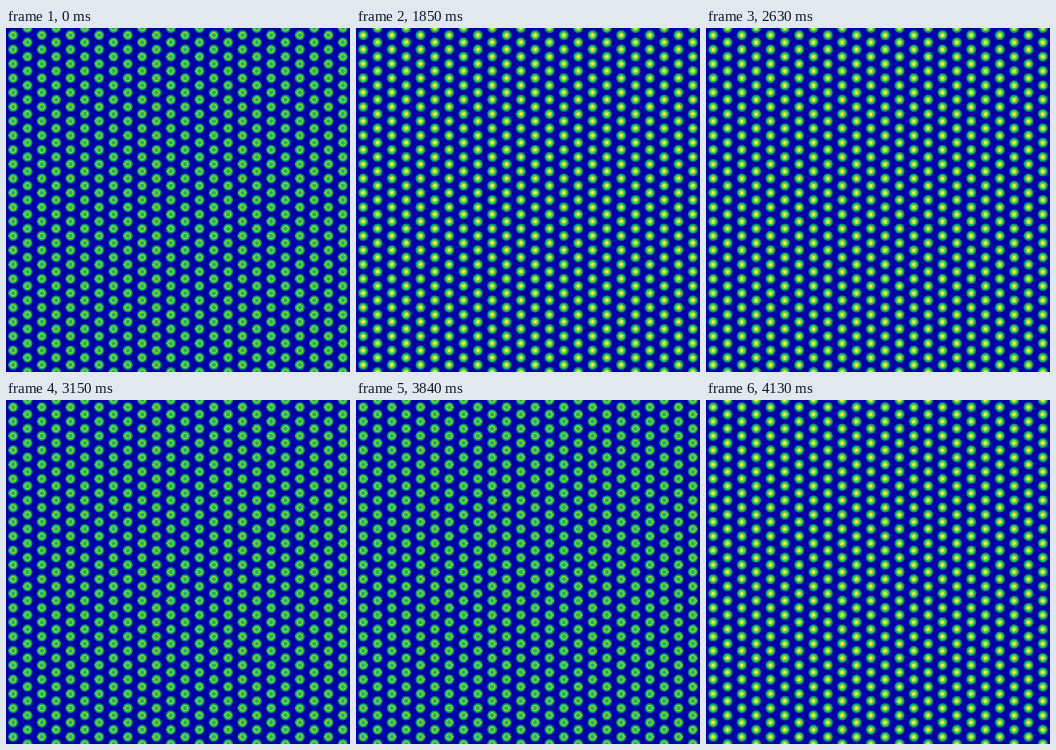
Write an HTML page with a canvas that moves like this. It is 748 px wide and 748 px high and loops after 4260 ms.

```html
<!DOCTYPE html>
<html>
<head>
<meta charset="utf-8">
<style>
html, body { margin: 0; width: 100%; height: 100%; overflow: hidden; background: #0000a4; }
canvas { display: block; }
</style>
</head>
<body>
<canvas width="748" height="748"></canvas>
<script>
const ctx = document.querySelector('canvas').getContext('2d');
const SIZE = 748, COUNT = 24, GAP = SIZE / COUNT, LOOP = 4260;
// Each time turns the marker another eighth clockwise, starting at the left.
const turns = [1330, 1590, 1850, 2110, 2370, 2630, 2890, 3150,
  3350, 3550, 3710, 3840, 3940, 4030, 4130];
const dark = '#128030', yellow = '#e8f424', green = '#0cc050';

function disc(x, r, color) {
  ctx.fillStyle = color;
  ctx.beginPath();
  ctx.arc(x, 0, r, 0, 2 * Math.PI);
  ctx.fill();
}

// A ring that may be open towards the marker.
function ring(r, width, color, gap = 0) {
  ctx.strokeStyle = color;
  ctx.lineWidth = width;
  ctx.beginPath();
  ctx.arc(0, 0, r, gap, 2 * Math.PI - gap);
  ctx.stroke();
}

function drawDot(x, y, step) {
  const sideways = step % 4 === 0;
  ctx.save();
  ctx.translate(x, y);
  ctx.rotate(Math.PI * (1 + step / 4));
  disc(0, 11, '#007c8c');
  disc(0, 9.4, '#00a46c');
  disc(0, 7.8, green);
  if (sideways) {
    ring(5.7, 1.6, yellow);
    disc(8, 1.3, yellow);
    ring(4.3, 1.2, dark, 0.3);
    ring(3.2, 1, '#a0e040');
    disc(0, 2.7, '#0c9c90');
    disc(0, 1, '#30b880');
  } else {
    disc(0, 6.4, yellow);
    ring(4.6, 1.2, dark, 0.25);
    disc(0, 4, '#d8f45c');
  }
  disc(6.5, 1, dark);
  ctx.restore();
}

function draw(step) {
  ctx.fillStyle = '#0000a4';
  ctx.fillRect(0, 0, SIZE, SIZE);
  for (let col = 0; col < COUNT; col++) {
    const offset = col % 2 ? 0 : GAP / 2;
    for (let row = 0; row <= COUNT; row++) {
      drawDot((col + 0.5) * GAP, offset + row * GAP, step);
    }
  }
}

let shown = -1;
function tick() {
  const time = performance.now() % LOOP;
  const step = turns.filter(t => t <= time).length % 8;
  if (step !== shown) draw(shown = step);
  requestAnimationFrame(tick);
}
tick();
</script>
</body>
</html>
```
